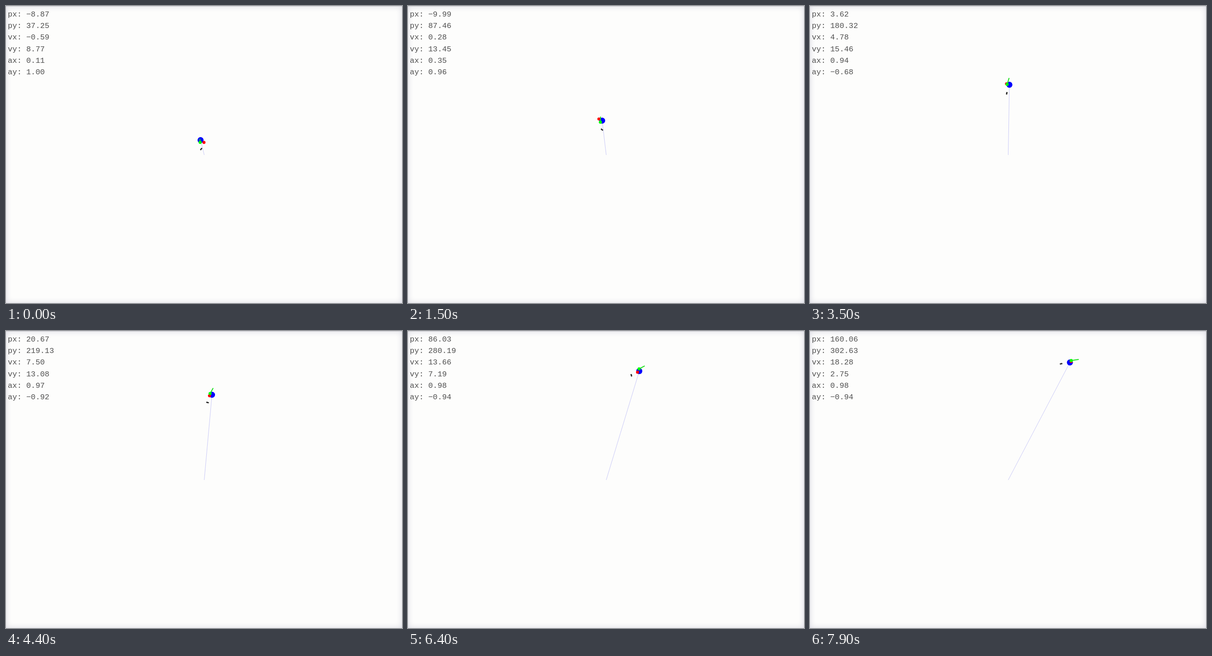
These frames come from a looping animation (864x648 px, 8 s). An HTML page with a canvas:

```html
<!DOCTYPE html>
<html lang="en">
<head>
<meta charset="utf-8">
<title>Steering simulation</title>
<style>
html, body { margin: 0; width: 100%; height: 100%; overflow: hidden; background: #fdfdfc; }
canvas { position: absolute; left: 0; top: 0; }
#edge { position: absolute; inset: 0; border-top: 1px solid #c6c6ca; box-shadow: inset 0 0 13px #d9d9e2; }
pre { position: absolute; left: 4px; top: 6px; margin: 0; color: #505050;
  font: 16.8px/25.2px "Liberation Mono", "Courier New", monospace; }
</style>
</head>
<body>
<div id="edge"></div>
<canvas id="stage" width="864" height="648"></canvas>
<pre id="readout"></pre>
<script>
const ctx = document.getElementById('stage').getContext('2d');
const readout = document.getElementById('readout');
const LOOP = 8, STEP = 0.1, SCALE = 0.844, THRUST = 3.147;

// Thrust on each axis eases from one level to another around the moment "turn"
const axes = {
  x: { pos: -8.87, vel: -0.59, flow: 3.09, from: 0.09, to: 0.98, turn: 1.95, ease: 0.5 },
  y: { pos: 37.25, vel: 8.77, flow: 3.01, from: 1, to: -0.94, turn: 2.842, ease: 0.35 },
};

function acceleration(axis, t) {
  return axis.from + (axis.to - axis.from) / (1 + Math.exp((axis.turn - t) / axis.ease));
}

// Integral of the acceleration
function velocity(axis, t) {
  const ramp = s => axis.ease * Math.log1p(Math.exp((s - axis.turn) / axis.ease));
  return axis.vel + THRUST * (axis.from * t + (axis.to - axis.from) * (ramp(t) - ramp(0)));
}

function position(axis, t) {
  let p = axis.pos;
  for (let s = STEP / 2; s < t; s += STEP) p += axis.flow * STEP * velocity(axis, s);
  return p;
}

function dot(x, y, r, color) {
  ctx.fillStyle = color;
  ctx.beginPath();
  ctx.arc(x, y, r, 0, 7);
  ctx.fill();
}

function line(x1, y1, x2, y2, width, color) {
  ctx.strokeStyle = color;
  ctx.lineWidth = width;
  ctx.beginPath();
  ctx.moveTo(x1, y1);
  ctx.lineTo(x2, y2);
  ctx.stroke();
}

const polar = (x, y, r, angle) => [x + r * Math.cos(angle), y + r * Math.sin(angle)];

function draw(t) {
  const both = rule => [rule(axes.x, t), rule(axes.y, t)];
  const p = both(position), v = both(velocity), a = both(acceleration);
  const x = 432 + SCALE * p[0], y = 324 - SCALE * p[1];
  const heading = Math.atan2(-v[1], v[0]);

  ctx.clearRect(0, 0, 864, 648);
  line(432.5, 325, x, y, 1, '#c8c8f6');

  // Spinning pair trailing behind the body
  const tail = polar(x, y, -19.5, heading), spin = 5.256 * t - 0.9;
  for (const side of [-1.3, 1.3]) dot(...polar(...tail, side, spin), 1.6, '#222');

  dot(x, y, 6.6, '#00f');
  dot(...polar(x, y, 9 - 0.7 * t, 0.6 + 6.2 * t), 3.3, '#f00');

  const [gx, gy] = polar(x, y, 5, 1.75 + 0.45 * t);
  line(gx, gy, gx + v[0] * 0.9, gy - v[1] * 0.9, 2, '#1be01b');
  dot(gx, gy, 3.4, '#0f0');

  const show = n => n.toFixed(2).replace('-', '\u2212');
  readout.textContent = Object.entries({ p, v, a })
    .map(([name, [dx, dy]]) => `${name}x: ${show(dx)}\n${name}y: ${show(dy)}`).join('\n');
}

const start = performance.now();
function tick() {
  const time = (performance.now() - start) / 1000 % LOOP;
  draw(Math.floor(time / STEP) * STEP);
  requestAnimationFrame(tick);
}
tick();
</script>
</body>
</html>
```
